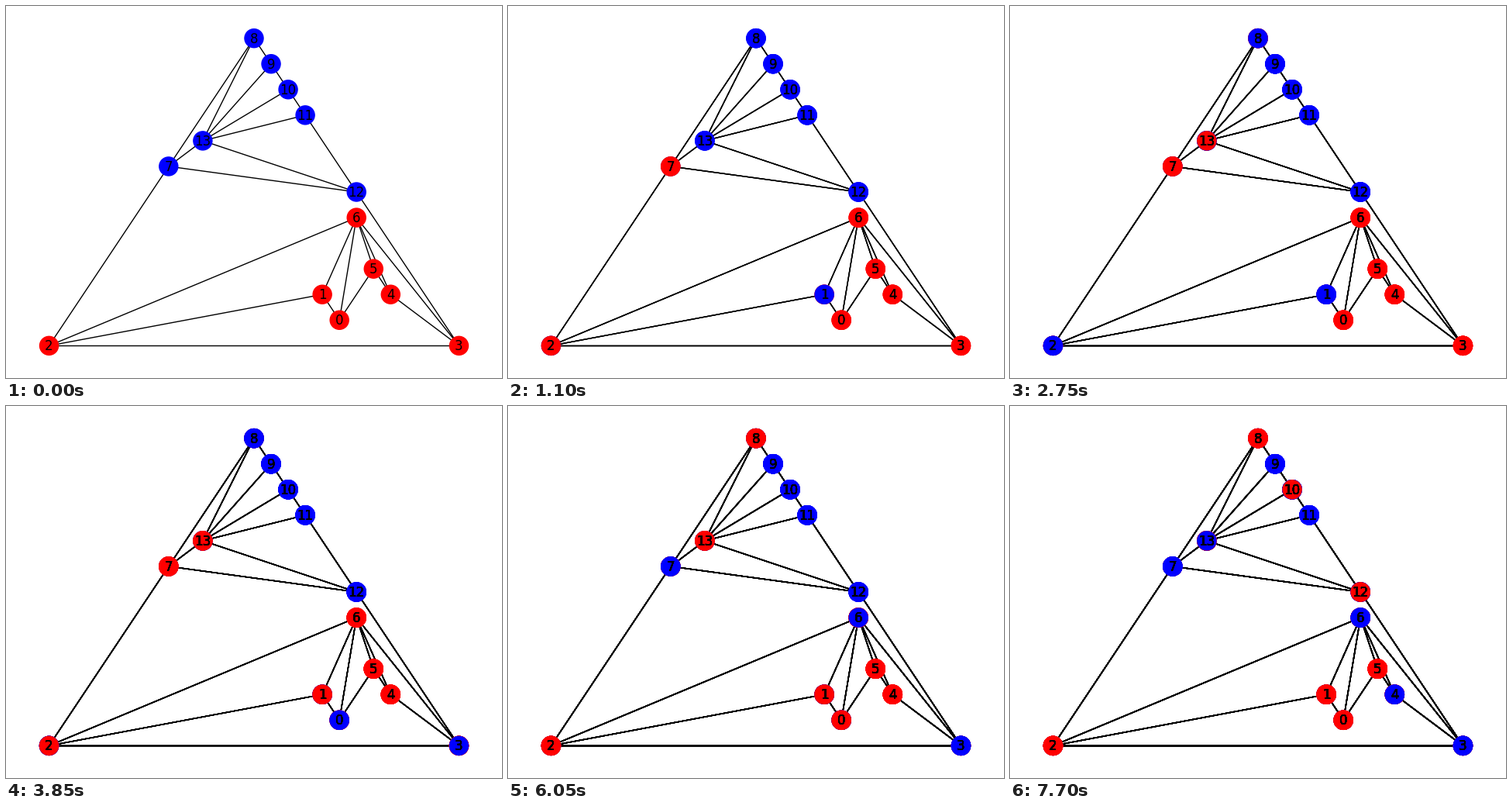
Write a matplotlib script that moves like this. It is 640 px wide and 480 px high and loops after 8000 ms.

```python
import matplotlib.pyplot as plt
from matplotlib.animation import FuncAnimation
from matplotlib.collections import LineCollection

LOOP, TICK, HOLD = 8000, 50, 550
W, H = 24, 12          # integer grid under the drawing
PAD = 1.21             # view size relative to the grid
PIXEL = PAD * H / 480  # one pixel in grid units

# the left and right sides of the big triangle rise at 45 grid degrees
POS = {n: (y, y) for n, y in ((2, 0), (7, 7))}
POS |= {n: (W - y, y) for n, y in ((3, 0), (12, 6))}
POS |= {8 + t: (H + t, H - t) for t in range(4)}
POS |= {0: (17, 1), 1: (16, 2), 4: (20, 2), 5: (19, 3), 6: (18, 5), 13: (9, 8)}

# red-blue neighbours that trade colours, one pair per step
SWAPS = [(2, 7), (1, 2), (7, 8), (2, 7), (8, 13), (0, 1), (3, 2),
         (13, 8), (7, 13), (1, 0), (6, 1), (4, 3), (3, 12), (13, 10)]


def wheel(first, size=6):
    """Edges of a ring of nodes, each also tied to the hub that follows."""
    hub = first + size
    for i in range(size):
        yield first + i, first + (i + 1) % size
        yield first + i, hub


EDGES = [*wheel(0), *wheel(7), (2, 7), (3, 12)]


def color_steps():
    red = set(range(7))
    yield red
    for old, new in SWAPS:
        red = (red - {old}) | {new}
        yield red


def draw_graph(ax, red):
    """Draw one complete graph and return its artists."""
    lines = LineCollection([(POS[a], POS[b]) for a, b in EDGES],
                           colors="black", linewidths=1, zorder=1)
    ax.add_collection(lines, autolim=False)
    colors = ["red" if n in red else "blue" for n in POS]
    dots = ax.scatter(*zip(*POS.values()), s=300, c=colors, zorder=2)
    labels = [ax.text(x, y - PIXEL, str(n), size=12, color="black",
                      ha="center", va="center", zorder=3)
              for n, (x, y) in POS.items()]
    return [lines, dots, *labels]


plt.rcParams["font.family"] = "DejaVu Sans"
fig = plt.figure(figsize=(6.4, 4.8), dpi=100, facecolor="white")
ax = fig.add_axes((0, 0, 1, 1))
ax.axis("off")

# graphs pile up, so lines and labels grow heavier with every step
layers = [draw_graph(ax, red) for red in color_steps()]
ax.set_xlim(W / 2 * (1 - PAD), W / 2 * (1 + PAD))
ax.set_ylim(H / 2 * (1 - PAD), H / 2 * (1 + PAD))


def update(i):
    step = i * TICK // HOLD
    for k, layer in enumerate(layers):
        for artist in layer:
            artist.set_visible(k <= step)
    return []


anim = FuncAnimation(fig, update, frames=LOOP // TICK, interval=TICK,
                     repeat=True, repeat_delay=0, blit=False)
plt.show()
```
